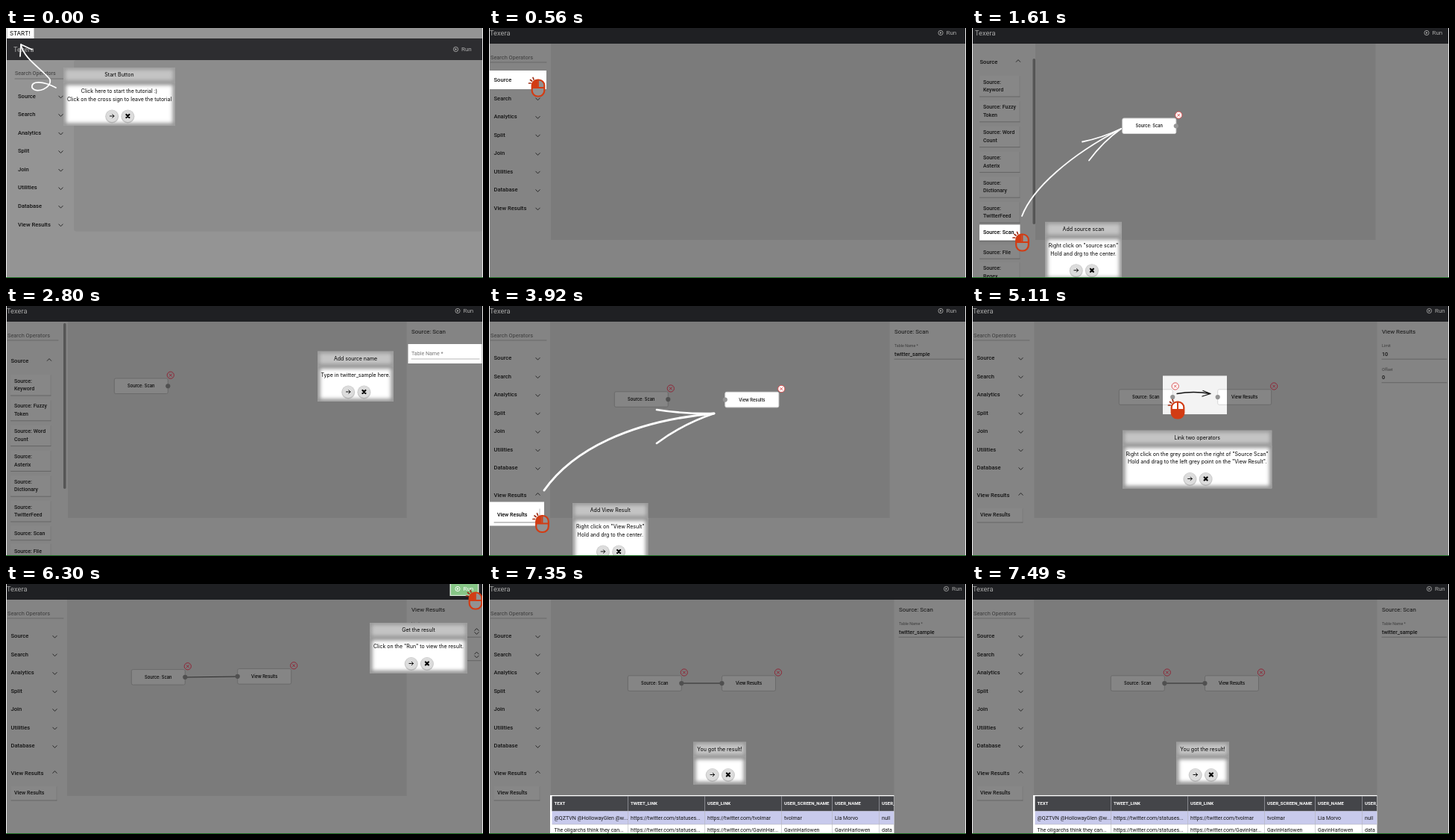
Write an HTML page that moves like this. It is 640 px wide and 335 px high and loops after 7.7 s.

```html
<!DOCTYPE html>
<html lang="en">
<head>
<meta charset="utf-8">
<title>Workflow tutorial</title>
<style>
  html, body { margin: 0; width: 100%; height: 100%; overflow: hidden; background: #848484; }
  #stage { display: block; width: 100vw; height: 100vh; }
  text { font-family: Roboto, sans-serif; white-space: pre; }
  .ui { font-family: Inter, sans-serif; }
  .mid { text-anchor: middle; }
  .strong { font-weight: 500; }
  .head { font-weight: 700; }
</style>
</head>
<body>
<svg id="stage" viewBox="0 0 640 335" preserveAspectRatio="none">
  <defs><filter id="soft" x="-20%" y="-30%" width="140%" height="160%"><feGaussianBlur stdDeviation="2.6"/></filter></defs>
</svg>
<script>
const LOOP = 7700;
const INK = '#141414', SIDE = '#848484', CANVAS = '#7b7b7b', RED = '#d23c14';
const GROUPS = ['Source', 'Search', 'Analytics', 'Split', 'Join', 'Utilities', 'Database'];
const SOURCES = ['Keyword', 'Fuzzy|Token', 'Word|Count', 'Asterix', 'Dictionary', 'TwitterFeed', 'Scan', 'File', 'Regex'];

const rect = (x, y, w, h, fill, more = '') =>
  `<rect x="${x}" y="${y}" width="${w}" height="${h}" fill="${fill}" ${more}/>`;
const path = (d, stroke, width = 1, more = '') =>
  `<path d="${d}" fill="none" stroke="${stroke}" stroke-width="${width}" stroke-linecap="round" stroke-linejoin="round" ${more}/>`;
const circle = (x, y, r, fill, more = '') =>
  `<circle cx="${x}" cy="${y}" r="${r}" fill="${fill}" ${more}/>`;
// y is the middle of the capital letters
const text = (x, y, str, size = 7.7, fill = INK, style = '') =>
  `<text x="${x}" y="${y + size * 0.35}" font-size="${size}" fill="${fill}" class="${style}">${str}</text>`;
const item = (x, y, str, size = 7.6) => text(x, y, str, size, INK, 'strong');
const label = (x, y, str, size = 7, style = '') => text(x, y, str, size, '#000', `ui mid ${style}`);

const chevron = (x, y, up) => {
  const s = up ? -1.4 : 1.4;
  return path(`M${x - 2.7} ${y - s}L${x} ${y + s}L${x + 2.7} ${y - s}`, '#2a2a2a', 1);
};

function frame(left, right, runX, titleX) {
  return rect(0, 0, 640, 335, SIDE) +
    rect(left, 21, right - left, 263, CANVAS) +
    rect(0, 0, 640, 21, '#1f2023') +
    text(titleX, 6.5, 'Texera', 9.3, '#a8a8a8') + runButton(runX, 6.5, '#a8a8a8');
}

function runButton(x, y, color) {
  return circle(x, y, 3.1, 'none', `stroke="${color}" stroke-width=".9"`) +
    `<path d="M${x - 1} ${y - 1.6}l2.6 1.6l-2.6 1.6z" fill="${color}"/>` +
    text(x + 7.5, y, 'Run', 8, color);
}

const search = (x, y, size, width) =>
  text(x, y, 'Search Operators', size, '#3c3c3c') + path(`M${x} ${y + 7}h${width}`, '#555', .6);

const groups = (x, y, chevronX, names = GROUPS) => names.map((name, i) =>
  item(x, y + i * 24.55, name) + chevron(chevronX, y + 1.5 + i * 24.55)).join('');

function card(x, y, w, h, fill = '#878787') {
  return rect(x, y, w, h, fill) + path(`M${x + w} ${y + 1}V${y + h}`, '#707070', .5) +
    path(`M${x} ${y + h}h${w}`, '#585858', .7);
}

function sourceList(x, y) {
  let out = item(x, y, 'Source') + chevron(x + 51.5, y - 1, true);
  let top = y + 19;
  for (const name of SOURCES) {
    const single = name === 'Scan' || name === 'File';
    const [first, second] = name.includes('|') ? name.split('|') : single ? [name] : ['', name];
    out += card(x, top, 53.5, single ? 19 : 28) +
      item(x + 4.5, top + (single ? 10 : 8.2), `Source: ${first}`, 7.05);
    if (second) out += item(x + 4.5, top + 18.7, second, 7.05);
    top += single ? 23.4 : 33.8;
  }
  return out;
}

const closedGroups = () => search(2, 39, 7.4, 75) + groups(6.5, 69.3, 65.5);

const closedSidebar = () => closedGroups() +
  item(6.5, 253, 'View Results') + chevron(65.5, 252, true) +
  card(7, 271, 61, 19) + item(11, 280, 'View Results', 7);

const closeMark = (x, y, color, fill = 'none') =>
  circle(x, y, 4.6, fill, `stroke="${color}" stroke-width="1"`) +
  path(`M${x - 1.6} ${y - 1.6}l3.2 3.2m0 -3.2l-3.2 3.2`, color, 1);

// ports is L or R, the side that carries the connection point
function node(x, y, name, ports, bright) {
  const w = 72, h = 20.5, mid = y + h / 2;
  const portX = ports === 'L' ? x : x + w;
  return rect(x, y, w, h, bright ? '#fff' : '#858585', `rx="2" stroke="${bright ? '#d6d6d6' : '#6a6a6a'}" stroke-width="1"`) +
    label(x + w / 2, mid, name, 5.75, 'strong') +
    circle(portX, mid, 3.1, bright ? '#959595' : '#505050') +
    closeMark(x + w + 3.5, y - 4.3, bright ? '#d85050' : '#8f2637', bright ? '#fff' : 'none');
}

function field(x, y, name, value) {
  return text(x, y, name, 5.3, '#3c3c3c') + item(x, y + 10.5, value, 7.2) +
    path(`M${x} ${y + 17.7}H637`, '#505050', .6);
}

const panelTitle = (x, name) => text(x, 34, name, 7.9);
const spinner = (x, y) => chevron(x, y - 2.5, true) + chevron(x, y + 2.5);

function shadedBox(x, y, w, h, fill, shade, width) {
  return `<svg x="${x}" y="${y}" width="${w}" height="${h}">` + rect(0, 0, w, h, fill) +
    `<rect width="${w}" height="${h}" fill="none" stroke="${shade}" stroke-width="${width}" filter="url(#soft)"/></svg>`;
}

function popup(x, y, w, title, lines = []) {
  const mid = x + w / 2, by = y + 44 + 10.5 * lines.length;
  const button = cx => circle(cx, by + .5, 9, '#777', 'opacity=".4"') + circle(cx, by, 7.9, '#dcdcdc');
  const a = mid - 9.8, b = mid + 11.4;
  return shadedBox(x, y, w, 20, '#c4c4c4', '#929292', 5) +
    shadedBox(x, y + 20, w, by + 13 - y - 20, '#fff', '#929292', 7) +
    label(mid, y + 9.9, title) +
    lines.map((line, i) => label(mid, y + 31.7 + i * 10.7, line)).join('') +
    button(a) + path(`M${a - 2.8} ${by}h5.6m-2.2 -2.2l2.2 2.2l-2.2 2.2`, '#000', .9) +
    button(b) + path(`M${b - 2} ${by - 2}l4 4m0 -4l-4 4`, '#000', 2.2);
}

function mouse(x, y, fill = '#929292', right = 'none') {
  return `<g transform="translate(${x} ${y})">` +
    path('M-8.5 -9l-2 -1.5M-6 -11l-1 -2.5M-10 -6h-2.5', '#9c2c14', 1.7) +
    rect(-8.3, -10.5, 16.6, 22, fill, 'rx="7.5"') +
    `<path d="M-8 0v-3q0 -7 7 -7v10z" fill="${right === 'none' ? RED : '#fff'}"/>` +
    `<path d="M1 -10q7 0 7 7v3h-7z" fill="${right}"/>` +
    rect(-8.3, -10.5, 16.6, 22, 'none', `rx="7.5" stroke="${RED}" stroke-width="2.2"`) +
    path('M-8 0h16M0 -10v10', RED, 1.8) + '</g>';
}

const edges = rect(0, 0, 1, 335, '#eee') + rect(639, 0, 1, 335, '#eee') +
  rect(0, 334, 640, 1, '#176a1d');

function startScene() {
  return rect(0, 0, 640, 335, '#949494') +
    rect(91, 43, 549, 229.5, '#8c8c8c', 'rx="3"') +
    rect(0, 14, 640, 29, '#2d2d30') +
    text(10, 28.5, 'Texera', 9.3, '#a8a8a8') + runButton(603.5, 28.5, '#b0b0b0') +
    search(12, 61, 7.1, 65) + groups(16, 91, 73.5, [...GROUPS, 'View Results']) +
    rect(1.5, 0, 36, 14, '#fff') + text(5, 6.7, 'START!', 8, '#000', 'ui') +
    path('M20 22C24 42 50 56 59 69C62 80 41 89 35 80C33 70 50 71 67 80', '#fff', 1.7) +
    path('M19 38L20 22L35 29', '#fff', 1.7) +
    popup(77, 53, 150, 'Start Button',
      ['Click here to start the tutorial :)', 'Click on the cross sign to leave the tutorial']);
}

function openScene() {
  return closedGroups() + item(6.5, 241, 'View Results') + chevron(65.5, 242.5) +
    rect(1, 57, 76, 25, '#fff') + item(6.5, 69.3, 'Source') + chevron(65.5, 70.8) +
    mouse(66, 80);
}

function scanScene() {
  return sourceList(10.5, 45) +
    rect(81.5, 41, 3.5, 222, '#555', 'rx="1.7"') +
    rect(10, 263.5, 54.5, 21, '#fff') + text(15, 274, 'Source: Scan', 7.05, '#000', 'strong') +
    node(201.8, 121, 'Source: Scan', 'R', true) +
    path('M67 252C81 215 132 170 200 135', '#fff', 1.8) +
    path('M148 152.5Q175 147 200 135Q176 152 157 177.5', '#fff', 1.8) +
    mouse(67.5, 287) +
    popup(98, 259.7, 103, 'Add source scan', ['Right click on "source scan"', 'Hold and drg to the center.']);
}

function nameScene() {
  return search(2, 39, 7.4, 68) + sourceList(6.5, 73) +
    rect(77, 23, 3.5, 222, '#555', 'rx="1.7"') +
    node(145.3, 97, 'Source: Scan', 'R') +
    panelTitle(544, 'Source: Scan') + rect(539.5, 51, 99, 26, '#fff') +
    text(544, 64, 'Table Name *', 7.1, '#777') + path('M544 71H635', '#888', .6) +
    popup(418, 60.5, 102, 'Add source name', ['Type in twitter_sample here.']);
}

function viewScene() {
  return closedSidebar() + rect(1, 262.5, 73, 32, '#fff') + card(7, 271, 61, 19, '#fff') +
    text(11, 280, 'View Results', 7, '#000', 'strong') +
    node(168.3, 114.8, 'Source: Scan', 'R') + node(316.8, 115.3, 'View Results', 'L', true) +
    path('M74 247C112 193 190 154 302 144', '#fff', 3) +
    path('M225 139Q264 145 302 144Q260 158 225 184', '#fff', 2.6) +
    mouse(71.5, 291.5) +
    panelTitle(544, 'Source: Scan') + field(544, 53.5, 'Table Name *', 'twitter_sample') +
    popup(112, 264, 101.5, 'Add View Result', ['Right click on "View Result"', 'Hold and drg to the center.']);
}

function linkScene() {
  return closedSidebar() +
    node(197.2, 111.8, 'Source: Scan', 'R') + node(329.7, 111.8, 'View Results', 'L') +
    '<svg x="256" y="93.3" width="86" height="52" viewBox="256 93.3 86 52">' +
    rect(256, 93.3, 86, 52, '#f3f3f3') +
    node(197.2, 111.8, 'Source: Scan', 'R', true) + node(329.7, 111.8, '', 'L', true) + '</svg>' +
    path('M275 117.5Q297 113.5 320 117.5M310 113.5L320 117.5L309 121', '#111', 1.3) +
    mouse(276, 139, RED, '#fff') +
    panelTitle(550, 'View Results') + field(550, 53.5, 'Limit', '10') + field(550, 85, 'Offset', '0') +
    popup(202, 166.5, 200.5, 'Link two operators', [
      'Right click on the grey point on the right of "Source Scan"',
      'Hold and drag to the left grey point on the "View Result".']);
}

function runScene() {
  return closedSidebar() + path('M240 125L311 124', '#2a2a2a') +
    node(168.3, 114.6, 'Source: Scan', 'R') + node(310.7, 113.6, 'View Results', 'L') +
    panelTitle(544, 'View Results') + field(544, 53.5, 'Limit', '10') + field(544, 85, 'Offset', '0') +
    spinner(631.5, 63.5) + spinner(631.5, 95) +
    rect(595.5, 0, 39, 16, '#dcecdc') + rect(597, 0, 36, 14.8, '#86c586') +
    runButton(606, 6.5, '#fff') + mouse(630, 22) +
    popup(488, 52, 131, 'Get the result', ['Click on the "Run" to view the result.']);
}

function resultScene() {
  const columns = [87.5, 190, 293, 396, 464, 527];
  const row = (y, cells, size, color, style) =>
    cells.map((cell, i) => text(columns[i], y, cell, size, color, style)).join('');
  const rules = columns.slice(1).map(x => `M${x - 3.5} 284.5V335`).join('');
  const link = 'https://twitter.com/';
  return closedSidebar() + path('M258 133H312', '#2a2a2a') +
    node(186.3, 122.8, 'Source: Scan', 'R') + node(312.5, 122.8, 'View Results', 'L') +
    panelTitle(550, 'Source: Scan') + field(550, 53.5, 'Table Name *', 'twitter_sample') +
    popup(274, 211.5, 71, 'You got the result!') +
    '<svg width="543.5" height="335">' + rect(82, 283, 462, 52, '#fff') +
    rect(84.5, 284.3, 459, 20.2, '#444549') + rect(84.5, 304.5, 459, 17.5, '#c8caec') +
    path(`M85 322H544${rules}`, '#b4b4bc', .6) +
    row(294, ['TEXT', 'TWEET_LINK', 'USER_LINK', 'USER_SCREEN_NAME', 'USER_NAME', 'USER_'], 6.1, '#fff', 'head') +
    row(313.6, ['@QZTVN @HollowayGlen @w...', link + 'statuses...', link + 'tvolmar', 'tvolmar', 'Lia Morvo', 'null'], 7.05) +
    row(330, ['The oligarchs think they can...', link + 'statuses...', link + 'GavinHar...', 'GavinHarlowen', 'GavinHarlowen', 'data'], 7.05) +
    '</svg>';
}

// start time in ms, markup
const scenes = [
  [0, startScene()],
  [350, frame(83, 640, 606, 1) + openScene()],
  [1540, frame(85, 541.5, 610, 4) + scanScene()],
  [2660, frame(83, 537.5, 606, 1) + nameScene()],
  [3920, frame(82, 537.5, 606, 1) + viewScene()],
  [5040, frame(83.5, 543.5, 613.5, 1) + linkScene()],
  [6160, frame(82, 537.5, 606, 1) + runScene()],
  [7280, frame(83, 543.5, 613.5, 1) + resultScene()],
];

const stage = document.getElementById('stage');
stage.insertAdjacentHTML('beforeend',
  scenes.map(([, markup]) => `<g class="scene" display="none">${markup}</g>`).join('') + edges);
const layers = [...stage.querySelectorAll('.scene')];
const began = performance.now();
let shown = -1;

function render() {
  const time = (performance.now() - began) % LOOP;
  const current = scenes.findLastIndex(([start]) => start <= time);
  if (current !== shown) {
    layers.forEach((layer, i) => layer.setAttribute('display', i === current ? 'inline' : 'none'));
    shown = current;
  }
  requestAnimationFrame(render);
}
render();
</script>
</body>
</html>
```
